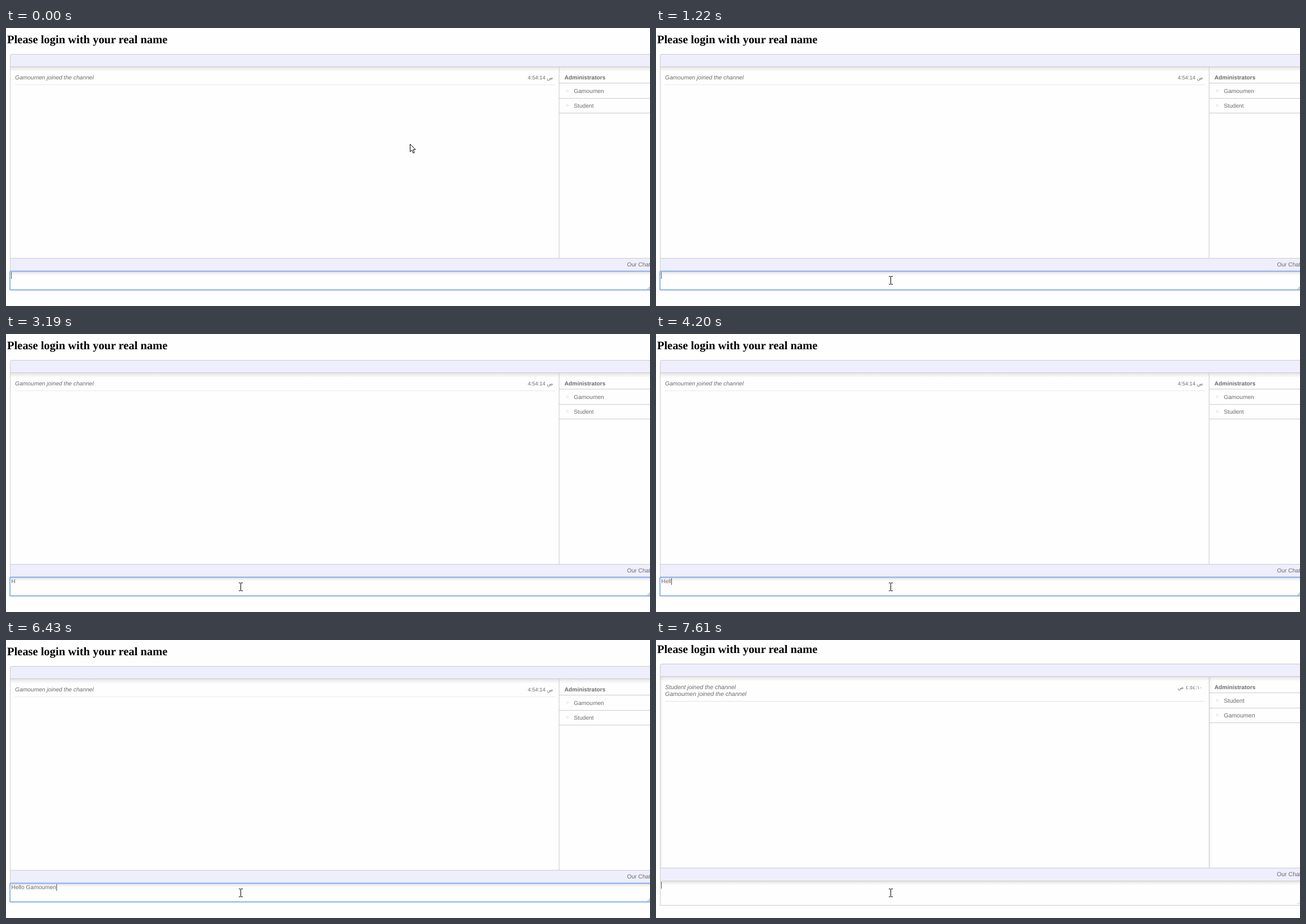
These frames come from a looping animation (1137x492 px, 8000 ms). An HTML page:

```html
<!DOCTYPE html>
<html lang="en">
<head>
<meta charset="utf-8">
<title>Chat demo</title>
<style>
  html, body { margin: 0; width: 100%; height: 100%; overflow: hidden; background: #fefefe; }
  svg { display: block; width: 1137px; height: 492px; }
  text {
    font: 10.2px Arial, "Liberation Sans", sans-serif;
    fill: #6c6c6c;
    text-rendering: geometricPrecision;
    white-space: pre;
  }
  .title { font: bold 20.4px "Times New Roman", "Liberation Serif", serif; fill: #000; }
  .bold { font-weight: bold; }
  .note { font-style: italic; }
  .time { font-size: 9.35px; }
  .arabic { font: 8.8px "DejaVu Sans", sans-serif; }
  #reloaded .wide { font-size: 10.55px; }
  .rule { fill: none; stroke: #ccc; shape-rendering: crispEdges; }
  .dotted { stroke: #d4d4d4; stroke-dasharray: 1 1; }
  .bar { fill: #eeeefd; }
  .bullet { fill: #fafafa; stroke: #e4e4e4; }
</style>
</head>
<body>
<svg viewBox="0 0 1137 492">
  <defs>
    <linearGradient id="shade" x2="0" y2="1">
      <stop stop-opacity=".1"/>
      <stop offset="1" stop-opacity="0"/>
    </linearGradient>
    <linearGradient id="sideShade">
      <stop stop-opacity=".05"/>
      <stop offset="1" stop-opacity="0"/>
    </linearGradient>
  </defs>

  <g id="page">
    <text class="title" x="2" y="27">Please login with your real name</text>
    <path class="bar" d="M7.5 68.5V49Q7.5 46.5 10 46.5H1140V68.5Z"/>
    <rect class="bar" x="7" y="407" width="1140" height="23"/>
    <rect x="8" y="69" width="1130" height="8" fill="url(#shade)"/>
    <rect x="8" y="431" width="1130" height="7" fill="url(#shade)"/>
    <path class="rule" style="shape-rendering:auto" d="M7.5 430V49Q7.5 46.5 10 46.5H1140"/>
    <path class="rule" d="M7 68.5H1140M7 407.5H1140M7 430.5H1140M976.5 69V407
      M977 97.5H1140M977 124.5H1140M977 150.5H1140"/>
    <text class="bold" x="986" y="91">Administrators</text>
    <circle class="bullet" cx="991" cy="111" r="2"/>
    <circle class="bullet" cx="991" cy="137" r="2"/>

    <g id="live">
      <text class="note" x="16" y="91">Gamoumen joined the channel</text>
      <text class="time" x="921.3" y="91">4:54:14</text>
      <text class="arabic" x="955" y="91">ص</text>
      <path class="rule dotted" d="M16 100.5H969"/>
      <text x="1002.5" y="115">Gamoumen</text>
      <text x="1002.5" y="141">Student</text>
      <text x="1096.5" y="422">Our Chat</text>
      <g id="message">
        <text class="bold" x="16" y="115">Gamoumen</text>
        <text x="16" y="127">Hello Gamoumen</text>
        <text class="time" x="921.3" y="115">4:55:08</text>
        <text class="arabic" x="955" y="115">ص</text>
        <path class="rule dotted" d="M16 136.5H969"/>
      </g>
      <rect x="7" y="430.5" width="1140" height="33" rx="1" fill="none" stroke="#86aeee" stroke-width="1.8"/>
      <path d="M1132.5 462.5L1137 458M1135.5 462.5L1137 461" stroke="#888"/>
      <text id="draft" x="9.3" y="441"></text>
    </g>

    <g id="reloaded">
      <rect x="8" y="69" width="5" height="338" fill="url(#sideShade)"/>
      <rect x="977" y="69" width="5" height="338" fill="url(#sideShade)"/>
      <text class="note wide" x="16" y="91">Student joined the channel</text>
      <text class="note wide" x="16" y="103">Gamoumen joined the channel</text>
      <text class="arabic" x="921" y="91">ص</text>
      <text class="arabic" x="935" y="91">٤:٥٤:١٠</text>
      <path class="rule" style="stroke:#e2e2e2" d="M16 112.5H969"/>
      <text class="wide" x="1002.5" y="115">Student</text>
      <text class="wide" x="1002.5" y="141">Gamoumen</text>
      <text class="wide" x="1096" y="422">Our Chat</text>
      <path class="rule" d="M7.5 430V473.5H1140"/>
      <path d="M1132 470.5H1137M1135 467.5H1137" stroke="#aaa" stroke-dasharray="1 1"/>
    </g>

    <rect id="caret" y="432" width="1" height="12" fill="#555"/>
  </g>

  <g id="pointer">
    <circle id="click" cx="-1" cy="-1" r="9.5" fill="none" stroke="#000"/>
    <path id="arrow" d="M.5 .5V14L3.6 11.1L5.9 16.4L8.1 15.4L5.8 10.2H10Z" fill="#fff" stroke="#000"/>
    <path id="beam" d="M-3-6.5H0M1-6.5H4M.5-6V7M-3 7.5H0M1 7.5H4" fill="none" stroke="#000" shape-rendering="crispEdges"/>
  </g>
</svg>
<script>
const LOOP = 8000, RELOAD = 7610;
const MESSAGE = "Hello Gamoumen";
const KEY_TIMES = [2640, 3650, 4030, 4200, 4430, 4580, 5210, 5510, 5590, 5740, 5900, 6050, 6130, 6430];
const CLEARED = 6830, SENT = 6910;
const CARET_OFF = [[540, 1070], [2090, 2640], [3190, 3650], [5130, 5210], [7370, RELOAD]];

const el = id => document.getElementById(id);
const show = (id, on) => { el(id).style.display = on ? "" : "none"; };
const within = (t, from, to) => t >= from && t < to;

// The mouse glides down into the text box in eleven discrete steps.
function pointerAt(t) {
  if (within(t, 7520, RELOAD)) return { x: 413, y: 447, beam: false };
  if (t >= 1300) return { x: 414, y: 447, beam: true };
  const step = Math.max(0, Math.min(11, Math.floor((t - 460) / 76) + 1));
  const rest = 1 - step / 11;
  const x = Math.round(414 + 299 * rest ** 2.47);
  const y = Math.round(446 - 241 * rest ** 2.07);
  return { x, y, beam: y > 431 };
}

function render(t) {
  const reloaded = t >= RELOAD;
  show("live", !reloaded);
  show("reloaded", reloaded);
  show("message", t >= SENT);
  el("page").setAttribute("transform", `translate(0 ${reloaded ? -4 : 0})`);

  const typed = t < CLEARED ? KEY_TIMES.filter(k => k <= t).length : 0;
  const draft = el("draft");
  draft.textContent = MESSAGE.slice(0, typed);
  const width = typed ? draft.getComputedTextLength() : 0;
  el("caret").setAttribute("x", Math.round(9.3 + width));
  show("caret", !CARET_OFF.some(([from, to]) => within(t, from, to)));

  const { x, y, beam } = pointerAt(t);
  el("pointer").setAttribute("transform", `translate(${x} ${y})`);
  show("arrow", !beam);
  show("beam", beam);
  show("click", within(t, 1470, 1710));
}

const start = performance.now();
function tick() {
  render((performance.now() - start) % LOOP);
  requestAnimationFrame(tick);
}
tick();
</script>
</body>
</html>
```
